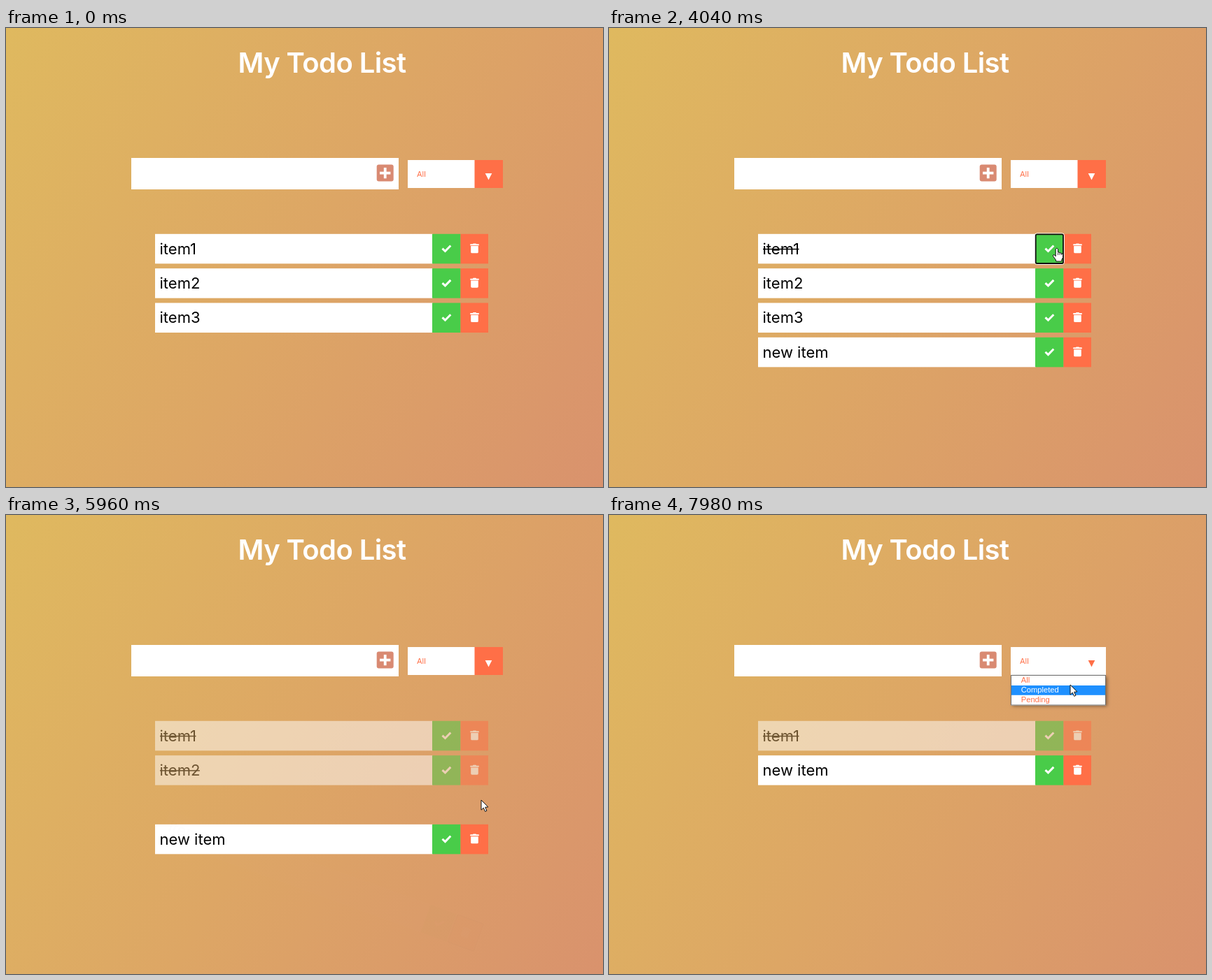
Write an HTML page with a canvas that moves like this. It is 853 by 657 pixels and loops after 8 s.

```html
<!DOCTYPE html>
<html lang="en">
<head>
<meta charset="utf-8">
<title>My Todo List</title>
<style>
html, body { margin: 0; width: 100%; height: 100%; overflow: hidden; }
canvas { display: block; }
</style>
</head>
<body>
<canvas id="stage" width="853" height="657"></canvas>
<script>
const W = 853, H = 657, LOOP = 8000;
const CORAL = '#ff6f47', GREEN = '#49cc49';
const SANS = 'Inter, "Open Sans", sans-serif';
const ARIAL = '"Liberation Sans", Arial, sans-serif';
const ROW = { x: 213, y: 294.8, w: 476, h: 42.5, pitch: 49.35 };

const stage = document.getElementById('stage').getContext('2d');
const layerCanvas = document.createElement('canvas');
layerCanvas.width = W;
layerCanvas.height = H;
const layer = layerCanvas.getContext('2d');

const FADE = 500, PRESS = 820, ENTER = 2720, BLUR = 3940;
const HOVER = 7440, OPEN = 7660;
const items = [
  { text: 'item1', born: 0, done: 4040 },
  { text: 'item2', born: 0, done: 4460, fall: 6440 },
  { text: 'item3', born: 0, fall: 5510 },
  { text: 'new item', born: ENTER }
];
// Button focus: start, end, item, button
const focuses = [
  [BLUR, 4400, 0, 'check'],
  [4400, 5460, 1, 'check'],
  [5460, 6010, 2, 'trash'],
  [6390, 6940, 1, 'trash']
];
const typed = 'new item';
const keyTimes = [1590, 1730, 1830, 1970, 2065, 2160, 2340, 2480];

// Pointer legs: start, end, control point, end point
const origin = [691, 617];
const legs = [
  [130, 900, 600, 330, 444, 227],
  [3180, 3620, 470, 95, 520, 265],
  [3620, 3900, 725, 290, 640, 315],
  [4100, 4390, 645, 350, 640, 378],
  [4720, 4960, 640, 395, 640, 427],
  [4990, 5380, 672, 432, 679, 408],
  [6080, 6340, 683, 388, 681, 368],
  [6760, 7360, 712, 310, 700, 243],
  [7400, 7600, 700, 225, 694, 214],
  [7720, 7960, 680, 246, 659, 243]
];

const clamp = v => Math.max(0, Math.min(1, v));
const mix = (a, b, p) => a + (b - a) * p;

// CSS "ease": cubic-bezier(.25, .1, .25, 1)
function ease(x) {
  x = clamp(x);
  let lo = 0, hi = 1;
  const bez = (s, a, b) => 3 * s * (1 - s) * (1 - s) * a + 3 * s * s * (1 - s) * b + s * s * s;
  for (let i = 0; i < 24; i++) {
    const m = (lo + hi) / 2;
    if (bez(m, .25, .25) < x) lo = m; else hi = m;
  }
  return bez(lo, .1, 1);
}

function rect(c, x, y, w, h, color) {
  c.fillStyle = color;
  c.fillRect(x, y, w, h);
}

function text(c, str, x, y, font, color, align = 'left') {
  c.font = font;
  c.fillStyle = color;
  c.textAlign = align;
  c.fillText(str, x, y);
}

function roundRect(c, x, y, w, h, r) {
  c.beginPath();
  c.roundRect(x, y, w, h, r);
}

function focusRing(c, x, y, w, h) {
  c.lineWidth = 1;
  c.strokeStyle = '#fff';
  roundRect(c, x - 1.2, y - 1.2, w + 2.4, h + 2.4, 3);
  c.stroke();
  c.lineWidth = 1.8;
  c.strokeStyle = '#101010';
  roundRect(c, x + .2, y + .2, w - .4, h - .4, 2);
  c.stroke();
}

function polygon(c, points) {
  c.beginPath();
  points.forEach(([x, y]) => c.lineTo(x, y));
}

function checkIcon(c, x, y) {
  polygon(c, [[x - 5.8, y + .4], [x - 1.8, y + 4.2], [x + 6, y - 3.8]]);
  c.lineWidth = 3;
  c.lineJoin = 'miter';
  c.strokeStyle = '#fff';
  c.stroke();
}

function trashIcon(c, x, y) {
  c.fillStyle = '#fff';
  roundRect(c, x - 6.3, y - 6, 12.6, 2, .6);
  c.fill();
  roundRect(c, x - 2.4, y - 6.9, 4.8, 1.8, .7);
  c.fill();
  roundRect(c, x - 5.3, y - 3.2, 10.6, 10.2, [0, 0, 1.6, 1.6]);
  c.fill();
}

function drawBackground(c) {
  // 120deg gradient line across the stage
  const dx = Math.sin(Math.PI * 2 / 3), dy = .5;
  const half = (W * dx + H * dy) / 2;
  const g = c.createLinearGradient(W / 2 - dx * half, H / 2 - dy * half,
                                   W / 2 + dx * half, H / 2 + dy * half);
  g.addColorStop(0, '#dfb95f');
  g.addColorStop(.5, '#dda665');
  g.addColorStop(1, '#d9926d');
  rect(c, 0, 0, W, H, g);
}

function drawTitle(c) {
  c.letterSpacing = '-0.6px';
  text(c, 'My Todo List', 451.5, 64, `600 40px ${SANS}`, '#fff', 'center');
  c.letterSpacing = '0px';
}

function drawForm(c, t) {
  rect(c, 179, 186, 382, 45, '#fff');
  c.fillStyle = '#d98a72';
  roundRect(c, 529.7, 195.5, 24, 24, 3);
  c.fill();
  rect(c, 534, 205.7, 15.4, 3.8, '#fff');
  rect(c, 539.8, 199.9, 3.8, 15.4, '#fff');

  if (t < PRESS || t >= BLUR) return;
  focusRing(c, 179.3, 186.1, 343.7, 45);
  const count = t < ENTER ? keyTimes.filter(k => t >= k).length : 0;
  const value = typed.slice(0, count);
  text(c, value, 186, 218, `400 25.5px ${SANS}`, '#000');
  const reset = Math.max(PRESS, ...[...keyTimes, ENTER].filter(k => t >= k));
  if ((t - reset) % 1000 < 500) {
    const x = Math.round(186 + c.measureText(value).width);
    rect(c, x, 193, 1, 31, '#000');
  }
}

function drawSelect(c, t) {
  const p = ease((t - HOVER) / 300);
  const blend = q => `rgb(255,${mix(111, 255, q)},${mix(71, 255, q)})`;
  rect(c, 574, 189, 136, 40, '#fff');
  rect(c, 669.5, 189, 40.5, 40, blend(p));
  text(c, 'All', 587, 212.5, `400 11px ${SANS}`, CORAL);
  c.fillStyle = blend(1 - p);
  polygon(c, [[684.7, 208], [694.3, 208], [689.5, 217.5]]);
  c.fill();
}

function drawPopup(c, t, y) {
  if (t < OPEN) return;
  c.save();
  c.shadowColor = 'rgba(0,0,0,.45)';
  c.shadowBlur = 5;
  c.shadowOffsetX = c.shadowOffsetY = 1.5;
  rect(c, 574, 229, 136, 43.5, '#fff');
  c.restore();
  const active = y >= 242 ? 1 : 0;
  rect(c, 575, active ? 244 : 230, 134.5, 13.8, '#1e90ff');
  ['All', 'Completed', 'Pending'].forEach((name, i) =>
    text(c, name, 588.7, 240.2 + i * 14, `11.2px ${ARIAL}`, i === active ? '#fff' : CORAL));
  c.lineWidth = 1;
  c.strokeStyle = '#6e6e6e';
  c.strokeRect(574.5, 229.5, 135, 42.5);
}

const isGone = (item, t) => item.fall && t >= item.fall + FADE;
const isFalling = (item, t) => item.fall && t >= item.fall;
const slotOf = (i, t) => items.slice(0, i).filter(o => !isGone(o, t)).length;
const rowTop = (i, t) => ROW.y + ROW.pitch * slotOf(i, t);

function drawRow(i, t) {
  const item = items[i], c = layer;
  const drop = isFalling(item, t) ? ease((t - item.fall) / FADE) : 0;
  const dim = item.done ? .5 * ease((t - item.done) / FADE) : 0;
  c.clearRect(0, 0, W, H);
  c.save();
  c.translate(ROW.x + ROW.w / 2, rowTop(i, t) + ROW.h / 2 + 109.5 * drop);
  c.rotate(drop * Math.PI / 9);
  c.translate(-ROW.w / 2, -ROW.h / 2);

  rect(c, 0, 0, 397, ROW.h, '#fff');
  rect(c, 396, 0, 40.5, ROW.h, GREEN);
  rect(c, 436.5, 0, 39.5, ROW.h, CORAL);
  text(c, item.text, 6.5, 28.8, `400 22px ${SANS}`, '#000');
  if (item.done && t >= item.done) {
    rect(c, 7, 21, c.measureText(item.text).width - 1, 1.5, '#000');
  }
  checkIcon(c, 416.3, 20.5);
  trashIcon(c, 456.5, 20.5);
  for (const [from, to, row, button] of focuses) {
    if (row === i && t >= from && t < to) {
      focusRing(c, button === 'check' ? 396.5 : 437, .3, 39.7, ROW.h - .4);
    }
  }
  c.restore();

  stage.globalAlpha = (1 - dim) * (1 - drop);
  stage.drawImage(layerCanvas, 0, 0);
  stage.globalAlpha = 1;
}

function drawRows(t) {
  const live = items.map((_, i) => i).filter(i => t >= items[i].born && !isGone(items[i], t));
  live.filter(i => !isFalling(items[i], t)).forEach(i => drawRow(i, t));
  live.filter(i => isFalling(items[i], t)).forEach(i => drawRow(i, t));
}

function pointerAt(t) {
  let [x, y] = origin;
  for (const [from, to, cx, cy, ex, ey] of legs) {
    if (t < from) break;
    let p = clamp((t - from) / (to - from));
    p = p * p * (3 - 2 * p);
    x = mix(mix(x, cx, p), mix(cx, ex, p), p);
    y = mix(mix(y, cy, p), mix(cy, ey, p), p);
  }
  return [x, y];
}

function onButton(x, y, t) {
  return x > 609 && x < 689 && items.some((item, i) => {
    const top = rowTop(i, t);
    return t >= item.born && !isFalling(item, t) && y > top && y < top + ROW.h;
  });
}

function arrowPath(c) {
  polygon(c, [[0, 0], [0, 14.2], [3.3, 11.2], [5.6, 16.4], [7.9, 15.4], [5.7, 10.3], [9.9, 10]]);
  c.closePath();
}

function handPath(c) {
  c.beginPath();
  c.moveTo(-1.8, 1.5);
  c.quadraticCurveTo(-.1, -1.2, 1.5, 1.5);
  c.lineTo(1.5, 6.2);
  c.quadraticCurveTo(3.2, 5.2, 4.1, 7);
  c.quadraticCurveTo(5.8, 6.2, 6.6, 8);
  c.quadraticCurveTo(8.6, 7.7, 8.7, 9.6);
  c.lineTo(8.6, 13.5);
  c.lineTo(6.8, 16.6);
  c.lineTo(6.8, 19);
  c.lineTo(-1.2, 19);
  c.lineTo(-1.6, 17);
  c.lineTo(-5.7, 11.2);
  c.quadraticCurveTo(-5.4, 8.4, -3.2, 10.2);
  c.lineTo(-1.8, 11.8);
  c.closePath();
}

function drawPointer(c, t, x, y) {
  if (t < 130) return;
  c.save();
  c.translate(x, y);
  c.lineWidth = 1;
  c.lineJoin = 'round';
  c.strokeStyle = '#111';
  c.fillStyle = '#fff';
  if (x > 179 && x < 523 && y > 186 && y < 231) {
    c.translate(.5, .5);
    c.beginPath();
    for (const s of [-1, 1]) {
      c.moveTo(-2.5, 7 * s);
      c.lineTo(2.5, 7 * s);
    }
    c.moveTo(0, -7);
    c.lineTo(0, 7);
    c.stroke();
  } else if (onButton(x, y, t)) {
    handPath(c);
    c.fill();
    c.stroke();
    c.beginPath();
    for (const kx of [1.5, 4.1, 6.6]) {
      c.moveTo(kx, 7);
      c.lineTo(kx, 10);
    }
    c.lineWidth = .8;
    c.stroke();
  } else {
    arrowPath(c);
    c.fill();
    c.stroke();
  }
  c.restore();
}

function draw(t) {
  const [x, y] = pointerAt(t);
  drawBackground(stage);
  drawTitle(stage);
  drawForm(stage, t);
  drawSelect(stage, t);
  drawRows(t);
  drawPopup(stage, t, y);
  drawPointer(stage, t, x, y);
}

const start = performance.now();
function tick() {
  draw((performance.now() - start) % LOOP);
  requestAnimationFrame(tick);
}
tick();
</script>
</body>
</html>
```
